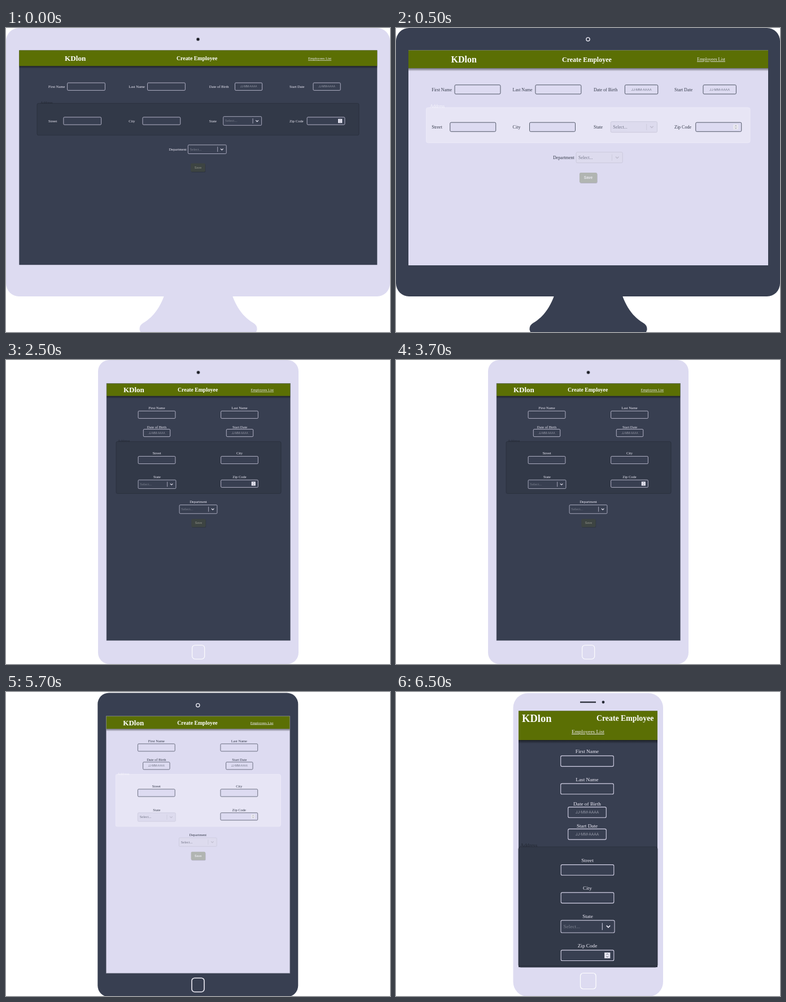
Recreate the animation shown at these times as an HTML page. Size 680 px wide and 538 px high, loop 8000 ms.

```html
<!DOCTYPE html>
<html lang="en">
<head>
<meta charset="utf-8">
<title>Create Employee</title>
<style>
html, body { margin: 0; width: 100%; height: 100%; overflow: hidden; background: #fff; }
svg { display: block; width: 680px; height: 538px; }
text { font-family: "Liberation Serif", "Times New Roman", serif; white-space: pre; }
.date { font-family: Roboto, sans-serif; }
.save { font-family: "Liberation Sans", Arial, sans-serif; font-weight: bold; }
.bold { font-weight: bold; }
.link { text-decoration: underline; }
</style>
</head>
<body>
<svg id="stage" viewBox="0 0 680 538">
  <defs>
    <linearGradient id="shade" x2="0" y2="1">
      <stop offset="0" stop-color="#000" stop-opacity=".5"/>
      <stop offset="1" stop-color="#000" stop-opacity="0"/>
    </linearGradient>
  </defs>
</svg>
<script>
const LIGHT = '#dddbf1', DARK = '#383f51', GREEN = '#5b6f04';

const THEMES = {
  dark: { frame: LIGHT, page: DARK, ink: '#eeecf8', set: '#323948', setLine: '#292f3b', legend: '#232832',
    line: '#d3d1e6', select: DARK, selectLine: '#c6c5da', sep: '#d3d1e6', chevron: '#f0eefa', hint: '#7d8290',
    date: '#9296a4', spin: '#e9e8f4', arrow: '#4a5060', button: '#3d4442', save: '#7b7f78' },
  light: { frame: DARK, page: LIGHT, ink: '#343a4a', set: '#e7e5f5', setLine: '#efedfa', legend: '#f8f7fd',
    line: '#4b5162', select: '#dddbee', selectLine: '#cbc9dc', sep: '#cccadb', chevron: '#c0becf', hint: '#74768a',
    date: '#74788a', spin: '#ebeaf1', arrow: '#77798a', button: '#b1b5b2', save: '#e8e8ee' }
};

// kind, label, desktop column, desktop row, gap from label to box in font units
const FIELDS = [
  ['text', 'First Name', 0, 0, 5.1], ['text', 'Last Name', 1, 0, 5.04],
  ['date', 'Date of Birth', 2, 0, 6.92], ['date', 'Start Date', 3, 0, 6.37],
  ['text', 'Street', 0, 1, 4.07], ['text', 'City', 1, 1, 3.74],
  ['select', 'State', 2, 1, 3.78], ['number', 'Zip Code', 3, 1, 4.72],
  ['select', 'Department', 4, 2, 5.13]
];
const WIDTHS = { text: 10.12, number: 10.12, date: 7.3, select: 10.28 };

const rect = (x, y, w, h, fill, r = 0, stroke = 'none', sw = 1) =>
  `<rect x="${x}" y="${y}" width="${w}" height="${h}" rx="${r}" fill="${fill}" stroke="${stroke}" stroke-width="${sw}"/>`;
const path = (d, stroke, sw, fill = 'none') =>
  `<path d="${d}" fill="${fill}" stroke="${stroke}" stroke-width="${sw}"/>`;
const dot = (x, y, r, fill, stroke = 'none', sw = 1) =>
  `<circle cx="${x}" cy="${y}" r="${r}" fill="${fill}" stroke="${stroke}" stroke-width="${sw}"/>`;
const text = (x, y, s, size, fill, cls = '', anchor = 'start') =>
  `<text x="${x}" y="${y}" font-size="${size}" fill="${fill}" class="${cls}" text-anchor="${anchor}">${s}</text>`;

function box(kind, x, y, u, t) {
  const w = WIDTHS[kind] * u, h = (kind === 'select' ? 2.36 : 2.02) * u, mid = y + h / 2;
  const isSelect = kind === 'select';
  let out = rect(x, y, w, h, isSelect ? t.select : t.page, u * .25, isSelect ? t.selectLine : t.line, u * .12);
  if (kind === 'date') out += text(x + w / 2, mid + u * .27, 'JJ-MM-AAAA', u * .75, t.date, 'date', 'middle');
  if (isSelect) {
    const sx = x + w - 2.35 * u, cx = x + w - 1.2 * u, a = u * .35;
    out += text(x + u * .5, mid + u * .3, 'Select...', u, t.hint)
      + path(`M${sx} ${y + u * .5}V${y + h - u * .5}`, t.sep, u * .11)
      + path(`M${cx - a} ${mid - a / 2}l${a} ${a}l${a} ${-a}`, t.chevron, u * .17);
  }
  if (kind === 'number') {
    const s = 1.1 * u, cx = x + w - 1.25 * u, a = u * .2;
    out += rect(cx - s / 2, mid - s / 2, s, s, t.spin)
      + path(`M${cx - a} ${mid - a * .7}l${a} ${-a}l${a} ${a}M${cx - a} ${mid + a * .7}l${a} ${a}l${a} ${-a}`, t.arrow, u * .1);
  }
  return out;
}

// Labels sit beside the boxes on the desktop and above them elsewhere.
function field([kind, label, col, row, gap], i, s, t) {
  const u = s.u;
  if (s.cols) {
    const x = s.cols[col], y = s.rows[row];
    return text(x, y, label, u, t.ink) + box(kind, x + gap * u, y - u * (kind === 'select' ? 1.53 : 1.36), u, t);
  }
  if (!s.spots[i]) return '';
  const [x, y] = s.spots[i];
  return text(x, y, label, u, t.ink, '', 'middle')
    + box(kind, x - WIDTHS[kind] * u / 2, y + u * (kind === 'date' ? .28 : .5), u, t);
}

function page(s) {
  const t = THEMES[s.theme], u = s.u, [x, y, w, h] = s.screen;
  const [fx, fy, fw, fh] = s.set;
  let out = rect(x, y, w, h, t.page)
    + rect(x, y + s.head, w, u * .7, 'url(#shade)')
    + rect(x, y, w, s.head, GREEN)
    + text(...s.brand, 'KDlon', u * 2, '#fff', 'bold')
    + text(...s.title, 'Create Employee', u * 1.495, '#fff', 'bold')
    + text(...s.link, 'Employees List', u, '#eeecf8', 'link')
    + rect(fx, fy, fw, fh, t.set, u * .4, t.setLine, .8)
    + text(...s.legend, 'Address', u, t.legend)
    + FIELDS.map((f, i) => field(f, i, s, t)).join('');
  if (s.save) {
    const bw = 3.9 * u, bh = 2.25 * u, bx = s.save[0] - bw / 2, by = s.save[1] - bh / 2;
    out += rect(bx + .6, by + 1, bw, bh, 'rgba(0,0,0,.18)', u * .3)
      + rect(bx, by, bw, bh, t.button, u * .3)
      + text(s.save[0], s.save[1] + u * .29, 'Save', u * .82, t.save, 'save', 'middle');
  }
  return out;
}

const camera = (x, y, theme) => theme === 'dark'
  ? dot(x, y, 3, '#1d1f27', '#b9b8c9', .8) : dot(x, y, 3.1, DARK, '#f0eff8', 1.3);

function monitor(s) {
  const c = THEMES[s.theme].frame;
  return rect(0, 0, 680, 475, c, 23)
    + path('M280 474C271 499 257 514 243 522Q236 526 236.5 534L238 538H443L444.500 534Q445 526 438 522C424 514 410 499 401 474Z', 'none', 0, c)
    + camera(340, 20, s.theme) + page(s);
}

function tablet(s) {
  const dark = s.theme === 'dark', c = THEMES[s.theme].frame;
  const [x, y, w, h] = s.screen;
  return rect(163, 0, 355, 538, c, 20) + camera(340.5, 22, s.theme) + page(s)
    + rect(x, y, w, h, 'none', 0, dark ? '#777b8c' : '#8a8d9c', .6)
    + rect(329.7, 504.7, 22, 24.500, c, 5, dark ? '#fff' : '#eeedf6', dark ? 1.1 : 1.6);
}

function phone(s) {
  return rect(207.5, 2, 265.5, 537, LIGHT, 26)
    + path('M326 18H354', '#30343f', 2.4) + dot(367, 18, 2.4, '#262a35') + page(s)
    + path('M217 484.5H463', '#282e3a', 1)
    + rect(326.5, 497.5, 27.5, 28, LIGHT, 5, '#fff', 1.2);
}

const pad = {
  u: 6.5, screen: [178, 41.3, 325.5, 455], head: 22.3,
  brand: [208, 57], title: [304, 56], link: [433.5, 55],
  set: [195, 144.3, 292, 92], legend: [198, 145], save: [341, 288.5],
  spots: [[267, 87], [413.5, 87], [267, 120.7], [414, 120.7], [267, 167.2], [413.5, 167.2],
    [267.5, 209], [413.5, 209], [340.5, 253.2]]
};

// start time, markup
const scenes = [
  [0, monitor({
    theme: 'dark', u: 6.6, screen: [23.3, 39.5, 634, 379.7], head: 27.7,
    brand: [104, 58], title: [302, 57], link: [535, 56],
    set: [55, 133.3, 570, 56.5], legend: [61, 134], save: [340, 247],
    cols: [75, 217.3, 359.8, 502, 288.5], rows: [106, 166.8, 217]
  })],
  [500, monitor({
    theme: 'light', u: 8, screen: [22, 39.5, 637, 380.5], head: 31.5,
    brand: [97.5, 60.5], title: [294, 59.5], link: [533, 58],
    set: [53.5, 141, 573.5, 62], legend: [60, 141], save: [340.5, 265],
    cols: [63.2, 206.6, 350, 493, 278], rows: [111.6, 178, 232]
  })],
  [2500, tablet({ theme: 'dark', ...pad })],
  [4500, `<g transform="translate(-.7 1.5)">${tablet({ theme: 'light', ...pad })}</g>`],
  [6500, phone({
    theme: 'dark', u: 9.25, screen: [217, 33.5, 246, 453.5], head: 51.5,
    brand: [223, 53], title: [355, 51.3], link: [311, 73],
    set: [217, 274, 246, 213], legend: [220, 274],
    spots: [[338.5, 108.3], [338.5, 157.5], [338.5, 201], [338.5, 239.8], [339, 301], [339, 350.3],
      [339.5, 399.5], [339, 452.2]]
  })]
];

const stage = document.getElementById('stage');
const groups = scenes.map(([, markup]) => {
  const g = document.createElementNS('http://www.w3.org/2000/svg', 'g');
  g.innerHTML = markup;
  return stage.appendChild(g);
});

const begin = performance.now();
function tick() {
  const time = (performance.now() - begin) % 8000;
  const current = scenes.filter(([at]) => at <= time).length - 1;
  groups.forEach((g, i) => { g.style.display = i === current ? '' : 'none'; });
  requestAnimationFrame(tick);
}
tick();
</script>
</body>
</html>
```
